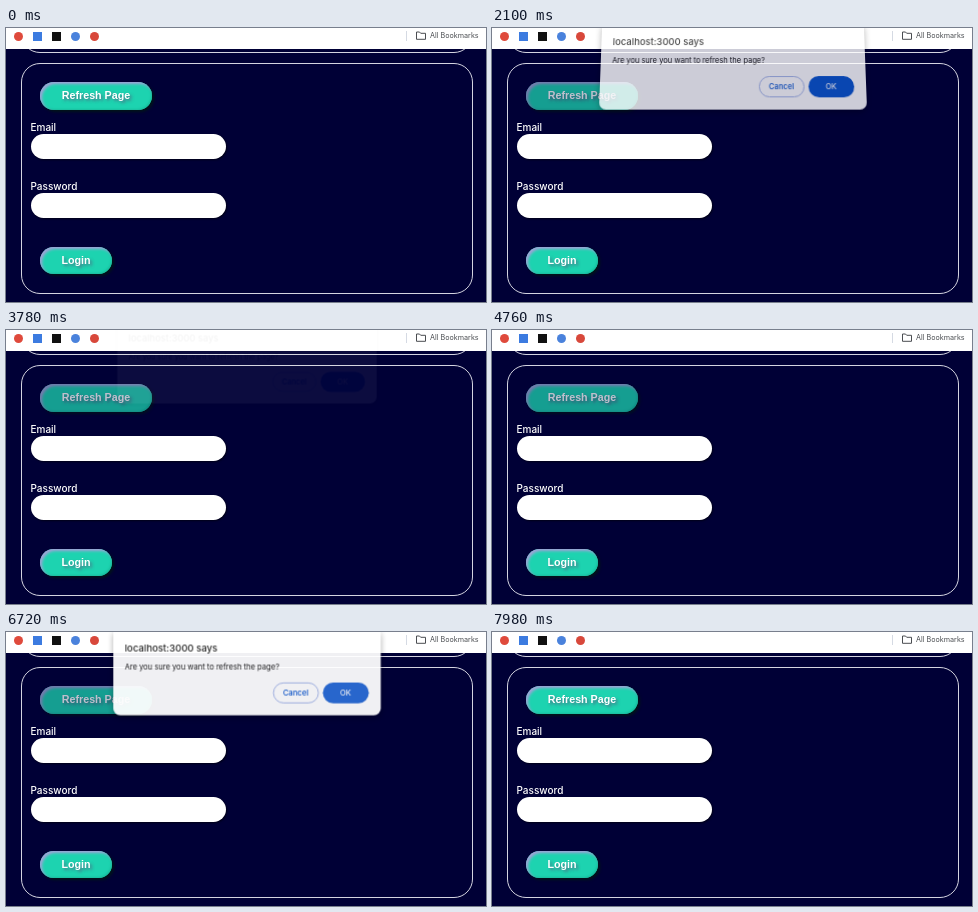
An HTML page that plays this animation: 480x274 px, repeating every 8000 ms.

```html
<!DOCTYPE html>
<html lang="en">
<head>
<meta charset="utf-8">
<title>Refresh confirmation</title>
<style>
  html, body { margin: 0; width: 100%; height: 100%; overflow: hidden; background: #000036; }
  body { position: relative; font-family: Inter, Roboto, sans-serif; }
  body * { position: absolute; box-sizing: border-box; white-space: nowrap; }

  /* Page */
  .card { left: 14.5px; width: 452.5px; border: 1px solid #d4d4e0; border-radius: 19px; }
  .previous { top: -60px; height: 85px; }
  .login { top: 34.5px; height: 231.5px; }
  .label { left: 24.5px; color: #fff; font-size: 10px; font-weight: 500; line-height: 12px; }
  .field {
    left: 24.5px; width: 195px; height: 25.5px; border-radius: 13px;
    background: #fff; box-shadow: 1px 1px 2px #000018;
  }
  .button {
    left: 34px; height: 27.5px; border-radius: 14px; background: #1dd3b0; color: #fff;
    font: bold 10.7px/27.5px "Liberation Sans", Arial, sans-serif; text-align: center;
    text-shadow: 2px 2px 3px rgba(90, 80, 120, .7);
    box-shadow: inset 2px 2px 3px #a5a0d8, inset -1px -1px 2px #17bd9d, 2px 2px 3px #001418;
  }
  .refresh { width: 112px; }

  /* Bookmarks bar */
  .bar { left: 0; top: 0; width: 100%; height: 20.5px; background: #fff; }
  .mark { top: 3.5px; width: 9px; height: 9px; }
  .round { border-radius: 50%; }
  .divider { left: 399.5px; top: 3px; width: 1px; height: 10px; background: #d5dae3; }
  .folder { left: 409px; top: 2px; }
  .bookmarks { left: 424px; top: 1.5px; font-size: 7.2px; line-height: 12px; color: #4a4d51; }

  /* Confirmation */
  .dialog {
    left: 107px; top: 0; width: 267.5px; height: 83.5px; border-radius: 0 0 7px 7px;
    transform-origin: 50% 100%; background: #fff; color: #1f1f1f;
    box-shadow: 0 2px 6px rgba(0, 0, 0, .35);
  }
  .title { left: 11.5px; top: 10px; font-size: 9.6px; font-weight: 500; line-height: 14px; }
  .message { left: 11.5px; top: 29.5px; font-size: 7.6px; line-height: 12px; }
  .choice {
    top: 50.5px; width: 45.5px; height: 21.5px; border-radius: 11px;
    font-size: 7.7px; font-weight: 500; line-height: 21.5px; text-align: center;
  }
  .cancel { left: 160px; line-height: 20px; color: #0b57d0; border: 1px solid #a8b9ea; }
  .ok { left: 210px; color: #fff; background: #0b57d0; }
  .hover { left: 0; top: 0; width: 100%; height: 100%; border-radius: 11px; opacity: 0; }
  .cancel .hover { background: rgba(31, 60, 120, .08); }
  .ok .hover { background: rgba(255, 255, 255, .13); }
</style>
</head>
<body>
  <div class="card previous"></div>
  <div class="card login"></div>
  <div class="button refresh" style="top:54px">Refresh Page</div>
  <div class="label" style="top:93px">Email</div>
  <div class="field" style="top:105.7px"></div>
  <div class="label" style="top:151.5px">Password</div>
  <div class="field" style="top:164.5px"></div>
  <div class="button" style="top:218.5px;width:72px">Login</div>

  <div class="bar">
    <div class="mark round" style="left:7.5px;background:#df4a3c"></div>
    <div class="mark" style="left:26.5px;background:#3c7be0"></div>
    <div class="mark" style="left:45.5px;background:#111"></div>
    <div class="mark round" style="left:64.5px;background:#4a82dc"></div>
    <div class="mark round" style="left:83.5px;background:#d8483b"></div>
    <div class="divider"></div>
    <svg class="folder" width="12" height="11" viewBox="0 0 12 11" fill="none" stroke="#4a4d51">
      <path d="M1.5 2h3l1.2 1.3h4.8v6h-9z" stroke-linejoin="round"/>
    </svg>
    <div class="bookmarks">All Bookmarks</div>
  </div>

  <div class="dialog">
    <div class="title">localhost:3000 says</div>
    <div class="message">Are you sure you want to refresh the page?</div>
    <div class="choice cancel"><div class="hover"></div>Cancel</div>
    <div class="choice ok"><div class="hover"></div>OK</div>
  </div>

<script>
  const LOOP = 8000;
  const [refresh, dialog, cancelHover, okHover] =
    ['.refresh', '.dialog', '.cancel .hover', '.ok .hover'].map(s => document.querySelector(s));
  const visits = [
    { open: 1990, close: 3565, hover: cancelHover },
    { open: 5095, close: 6685, hover: okHover },
  ];

  const ramp = (t, start, length) => Math.min(1, Math.max(0, (t - start) / length));
  const easeOut = p => 1 - (1 - p) ** 2;
  const easeInOut = p => p * p * (3 - 2 * p);

  function draw(t) {
    refresh.style.opacity = 1 - .25 * (ramp(t, 1190, 400) - ramp(t, 7630, 260));

    const visit = visits.findLast(v => t >= v.open) || visits[0];
    const shown = easeOut(ramp(t, visit.open, 200));
    const gone = easeInOut(ramp(t, visit.close, 250));
    const swing = 1 - shown;

    // Swings down into place, then shrinks upwards.
    dialog.style.opacity = shown * (1 - gone);
    dialog.style.transform = swing || gone
      ? `translateY(${-12 * swing - 11 * gone}px) perspective(560px) rotateX(${45 * swing}deg)
         scaleY(${1 + .2 * swing}) scale(${1 - .034 * gone})`
      : 'none';
    for (const { hover } of visits) {
      hover.style.opacity = hover === visit.hover ? ramp(t, visit.close - 500, 150) : 0;
    }
  }

  function frame() {
    draw(performance.now() % LOOP);
    requestAnimationFrame(frame);
  }
  frame();
</script>
</body>
</html>
```
